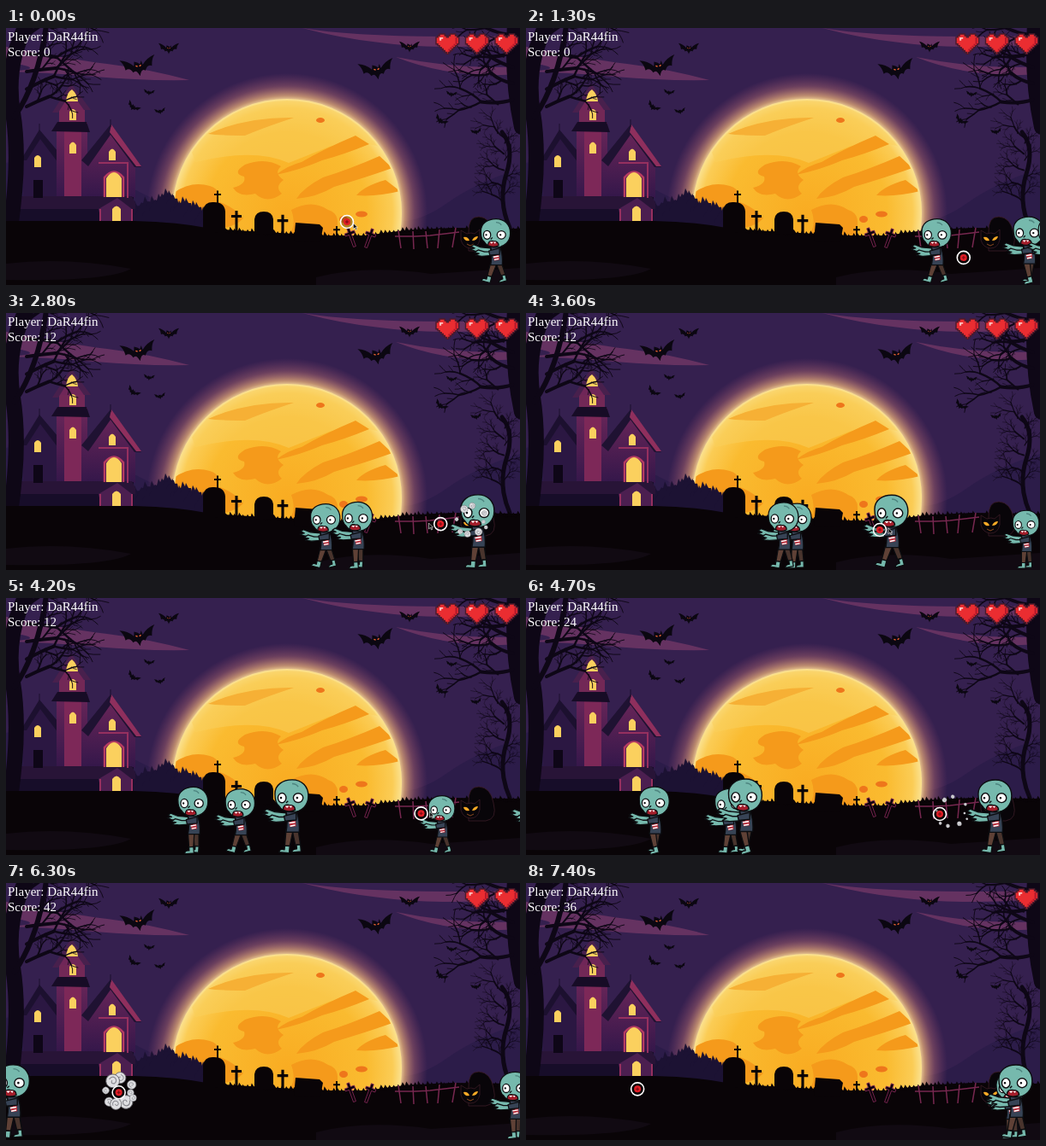
Recreate the animation shown at these times as an HTML page. Size 600 by 301 pixels, loop 7500 ms.

```html
<!DOCTYPE html>
<html lang="en">
<head>
<meta charset="utf-8">
<title>Zombie night</title>
<style>
html, body { margin: 0; width: 100%; height: 100%; overflow: hidden; background: #090407; }
svg { display: block; width: 600px; height: 301px; }
text { font: 15px "Liberation Serif", "Times New Roman", serif; fill: #fff; }
.tree { fill: none; stroke: #0e0716; stroke-linecap: round; }
.lit { fill: #fbd05e; }
.skin { fill: #76b9ad; }
.ink { stroke: #0c0d10; stroke-width: 1.2; stroke-linejoin: round; }
</style>
</head>
<body>
<svg viewBox="0 0 600 301">
<defs>
  <radialGradient id="sky" gradientUnits="userSpaceOnUse" r="1" gradientTransform="translate(308 120) scale(275 205)">
    <stop offset=".15" stop-color="#cf5f78"/><stop offset=".33" stop-color="#ac4a75"/>
    <stop offset=".58" stop-color="#7b316c"/><stop offset=".78" stop-color="#532860"/>
    <stop offset="1" stop-color="#35204f"/>
  </radialGradient>
  <radialGradient id="halo" gradientUnits="userSpaceOnUse" cx="328" cy="217" r="164">
    <stop offset=".8" stop-color="#ffe9a5"/><stop offset=".84" stop-color="#eab07a" stop-opacity=".75"/>
    <stop offset=".91" stop-color="#cf7a78" stop-opacity=".35"/><stop offset="1" stop-color="#b5557a" stop-opacity="0"/>
  </radialGradient>
  <radialGradient id="moon" gradientUnits="userSpaceOnUse" cx="328" cy="217" r="134">
    <stop offset="0" stop-color="#f9ac22"/><stop offset=".7" stop-color="#fabb30"/>
    <stop offset=".92" stop-color="#fbcc55"/><stop offset="1" stop-color="#fbe290"/>
  </radialGradient>
  <linearGradient id="wall" x2="0" y2="1">
    <stop offset="0" stop-color="#6b2659"/><stop offset="1" stop-color="#34174a"/>
  </linearGradient>
  <clipPath id="disc"><circle cx="328" cy="217" r="132"/></clipPath>
  <path id="bat" d="M0-6l2 2 2-4 1 5q6-7 15-9q-4 4-5 12q-5-3-8 4q-4-4-7 5q-3-9-7-5q-3-7-8-4q-1-8-5-12q9 2 15 9l1-5z"/>
  <path id="cross" d="M-1.5 0V-15H-6V-18H-1.5V-23H1.5V-18H6V-15H1.5V0z"/>
  <g id="heart">
    <path d="M2 0h3v1h1v1h1v-1h1v-1h3v1h1v1h1v4h-1v1h-1v1h-1v1h-1v1h-1v1h-1v1h-1v-1h-1v-1h-1v-1h-1v-1h-1v-1h-1v-1h-1v-4h1v-1h1z" fill="#ea2d31" stroke="#4b1a2b" stroke-width=".7"/>
    <path d="M2 2h2v1h-1v1h-1z" fill="#ffc4c0"/>
    <path d="M11 2h1v4h-1v1h-1v1h-1v1h-1v1h-1v-1h1v-1h1v-1h1v-1h1z" fill="#b5182a"/>
  </g>
  <g id="zombie" class="ink">
    <g class="leg"><path d="M0 34h6l1 15h-5z" fill="#49342d"/><path class="skin" d="M3 49h4v7h-9q0-3 5-3z"/></g>
    <g class="leg"><path d="M-6 34h7l-2 16h-5z" fill="#5f4136"/><path class="skin" d="M-6 50h5v7h-10q0-4 5-3z"/></g>
    <path d="M-6 15q6-3 10 0q4 9 3 21h-13q2-10 0-21z" fill="#374355"/>
    <path d="M-4 22l7-1 1 9-6 1z" fill="#b72c3a" stroke="none"/>
    <path d="M-3 24l5-1m-5 4l6-1m-5 4l5-1" stroke="#fff" stroke-width="1.3"/>
    <path class="skin" d="M-6 17l-11-1-8-3-3 2 4 2-5 1 5 2 8 1 10 1z"/>
    <path class="skin" d="M-1 21l-12 0-7-2-4 3 5 1-4 2 7 1 15-1z"/>
    <path d="M4 17l-12 3 1 5 11-1z" fill="#374355"/>
    <path class="skin" d="M-17-2C-17-11-9-16 0-16C10-16 16-9 16 0C16 9 10 16 0 16C-6 16-11 14-13 10C-16 8-17 3-17-2z"/>
    <g fill="#fff">
      <ellipse cx="-10" cy="2" rx="4" ry="4.8"/><ellipse cx="6" cy="2" rx="4.8" ry="4.6"/>
    </g>
    <circle cx="-11" cy="2" r=".5"/><circle cx="5" cy="2" r=".5"/>
    <path d="M-4 5l-2 2" fill="none"/>
    <path d="M-9 14q0-6 6-5q6 0 6 5q-6 3-12 0z" fill="#a41e2b"/>
    <path d="M-7 10l2 2 2-2 2 2 1-2" fill="#fff" stroke="none"/>
    <path d="M0-12q4 0 6 3" fill="none" stroke="#4d847f"/>
  </g>
</defs>

<rect width="600" height="301" fill="url(#sky)"/>
<g fill="#b3507f" opacity=".38">
  <path d="M0 22Q70 36 118 42T214 61Q160 62 104 57T0 51Q56 48 0 40z"/>
  <path d="M346 0Q420 13 600 9V19Q502 26 436 17Q390 12 346 0z"/>
  <path d="M455 34Q530 49 600 45V54Q520 60 455 34z"/>
</g>
<path d="M0 158Q50 142 100 165T200 215V240H0zM600 165Q550 180 515 205T450 226V262H600z" fill="#281a48" opacity=".7"/>
<circle cx="328" cy="217" r="164" fill="url(#halo)"/>
<circle cx="328" cy="217" r="134" fill="url(#moon)"/>
<g clip-path="url(#disc)" fill="#f59a1b">
  <path d="M215 140Q260 85 330 84Q400 86 440 140Q400 128 370 142L330 158Q290 140 221 157z" fill="#f9cf5b" opacity=".55"/>
  <path d="M236 124Q280 104 336 105Q300 117 279 126Q250 126 236 124z" fill="#f6b035"/>
  <path d="M408 126Q370 142 345 157Q329 161 315 172Q344 166 369 155Q395 148 424 136z"/>
  <path d="M436 150Q402 165 370 175Q347 187 339 200Q363 198 383 186Q420 175 451 164z"/>
  <path d="M279 160Q303 151 321 162Q312 170 324 178Q313 186 322 194Q305 207 291 194Q272 199 265 187Q281 183 278 174Q263 170 279 160z"/>
  <path d="M192 196Q214 178 238 185Q252 189 246 203Q265 208 277 223Q262 240 195 240z"/>
  <path d="M333 213q24-13 43 0q17 5 8 30h-55q11-10 4-30z"/>
  <path d="M443 178q-25 7-34 18q23 2 51-5z"/>
  <g fill="#ee761b">
    <ellipse cx="415" cy="218" rx="7" ry="3.5"/><ellipse cx="394" cy="224" rx="5" ry="4"/>
    <ellipse cx="367" cy="108" rx="5" ry="3"/>
  </g>
</g>
<g id="bushes" fill="#1c1233"></g>

<g id="house">
  <path d="M20 152L39 122 60 150V200H20z" fill="#2b1742"/>
  <path d="M39 119L17 155H24L40 130 61 158V145z" fill="#1c102f"/>
  <path d="M59 111H95V201H59z" fill="url(#wall)"/>
  <path d="M68 111H88V201H68z" fill="#7d2858"/>
  <path d="M62 90H92V112H62z" fill="#722856"/>
  <path d="M76 66L57 96H97z" fill="#702658"/>
  <path d="M76 65L54 99H61L76 75 91 96H99z" fill="#48204d"/>
  <path d="M53 121L60 110H94L98 122z" fill="#170c26"/>
  <path d="M94 150L123 116 151 159V199H94z" fill="url(#wall)"/>
  <path d="M122 113L88 155 96 162 122 125 150 163H158z" fill="#1f1232"/>
  <path d="M123 113L158 162H152L121 122z" fill="#8f2f5d"/>
  <path d="M7 198H149V229H7z" fill="#170d29"/>
  <path d="M4 204L16 197H147L151 205V212H4z" fill="#281437"/>
  <path d="M108 212L130 199 147 212V229H112z" fill="#4c1f50"/>
  <path d="M108 158H142V199M147 212V229M110 212V229" fill="none" stroke="#96305f" stroke-width="2"/>
  <path d="M115 198V175Q126 162 137 175V198" fill="none" stroke="#b53b62" stroke-width="2.5"/>
  <path d="M32 178H43V199H32z" fill="#0e0617"/>
  <g class="lit">
    <path d="M70 86Q71 75 77 72Q83 77 84 86z"/><path d="M74 108V98q4-6 8 0V108z"/>
    <path d="M74 147V137q4-7 8 0V147z"/><path d="M33 163V152q4-6 8 0V163z"/>
    <path d="M120 155V145q4-7 8 0V155z"/><path d="M117 198V176Q126 162 135 176V198z"/>
    <path d="M124 228V212q5-7 10 0V228z"/>
  </g>
  <path d="M76 55V67M39 112V121M122 107V116" stroke="#1c102f"/>
</g>

<g id="trees" class="tree">
  <path d="M5 234Q17 155 8 99T24-4" stroke-width="18"/>
  <path d="M10 104Q38 63 47-3" stroke-width="6"/>
  <path d="M602 116Q590 61 594-4" stroke-width="18"/>
  <path d="M588 234Q574 202 584 171T579 122" stroke-width="5"/>
</g>

<g id="ground" fill="#090407">
  <path d="M0 226H150Q200 227 240 235L300 239 375 243 420 243 465 237 520 234 600 235V301H0z"/>
</g>
<path d="M0 276Q70 268 146 282Q120 297 0 295zM362 292Q420 277 496 288L600 281V301H362z" fill="#110a12"/>
<g fill="#090407">
  <path d="M230 239V213Q232 203 243 204Q255 204 256 215V239z"/>
  <path d="M290 241V224Q291 215 301 215Q311 215 312 224V241z"/>
  <path d="M336 249L338 228 366 230 370 234 367 250z"/>
  <use href="#cross" transform="translate(247 206) scale(.67)"/>
  <use href="#cross" transform="translate(269 237)"/>
  <use href="#cross" transform="translate(323 243) scale(1.05)"/>
  <use href="#cross" transform="translate(386 247) scale(.65)"/>
  <g stroke="#832757" stroke-width=".8">
    <use href="#cross" transform="translate(407 256) rotate(-20)"/>
    <use href="#cross" transform="translate(420 257) rotate(20)"/>
  </g>
</g>
<path d="M458 237l3 21M475 238l1 21M490 238l2 20M506 236l-2 22M525 234l-4 23M454 244l24 0 17-1 34-4" stroke="#76274f" stroke-width="1.5" fill="none"/>
<g id="bats" fill="#0b0711"></g>
<g id="cat" fill="#080509" stroke="#43202c" stroke-width=".7">
  <path d="M540 240Q539 221 552 221Q566 222 569 240Q574 259 560 261H540z"/>
  <path d="M531 237l7 4q5-2 9 0l6-5 0 12q-2 10-11 10q-9-1-11-10z"/>
  <path d="M534 245q5-1 7 4q-6 1-7-4zM551 244q-5 0-7 5q6 0 7-5z" fill="#ffab26" stroke="none"/>
  <path d="M538 253l4 2 4-2" stroke="#c56b29" fill="none"/>
</g>

<g id="actors"></g>
<g id="puffs"></g>
<g id="hearts"></g>
<text x="2" y="15">Player: DaR44fin</text>
<text id="score" x="2" y="33">Score: 0</text>
<path id="arrow" d="M0 0V7L2 5.3 3 8 4.3 7.4 3.2 5H5z" fill="#111" stroke="#fff" stroke-width=".6"/>
<g id="aim">
  <circle r="7.5" fill="#120508" fill-opacity=".3" stroke="#fff" stroke-width="1.6"/>
  <circle r="4" fill="#e01e26"/><path d="M-2 0H2M0-2V2" stroke="#7a0b14"/>
</g>
</svg>

<script>
const LOOP = 7500, STEP = 100;
const $ = id => document.getElementById(id);
const place = (el, value) => el.setAttribute('transform', value);
const show = (el, on) => el.setAttribute('visibility', on ? 'visible' : 'hidden');

function add(parent, tag, attrs = {}) {
  const el = document.createElementNS('http://www.w3.org/2000/svg', tag);
  for (const key in attrs) el.setAttribute(key, attrs[key]);
  return parent.appendChild(el);
}

let seed = 7;
const rnd = () => (seed = seed * 16807 % 2147483647) / 2147483647;
const vary = span => (rnd() - .5) * span;

// Each branch forks twice at its tip and sends one twig from its middle
function grow(x, y, angle, len, width, forks) {
  const a = angle * Math.PI / 180;
  const ex = x + len * Math.cos(a), ey = y + len * Math.sin(a);
  const mx = (x + ex) / 2 + vary(len * .3), my = (y + ey) / 2 + vary(len * .3);
  add($('trees'), 'path', { d: `M${x} ${y}Q${mx} ${my} ${ex} ${ey}`, 'stroke-width': width });
  if (!forks) return;
  for (const side of [-1, 1])
    grow(ex, ey, angle + side * (16 + rnd() * 24), len * (.55 + rnd() * .25), width * .62, forks - 1);
  grow(mx, my, angle + (rnd() < .5 ? -45 : 45), len * .45, width * .5, forks - 1);
}
function limbs(x, top, bottom, n, angle, len) {
  for (let i = 0; i < n; i++)
    grow(x, top + (bottom - top) * i / (n - 1), angle + vary(40), len * (.8 + rnd() * .4), len / 8, 3);
}
limbs(24, 10, 92, 5, -12, 32);
limbs(592, 8, 84, 5, 186, 32);
limbs(581, 128, 205, 5, 212, 15);
limbs(582, 135, 195, 4, -40, 10);

for (let x = 146; x < 242; x += 4) {
  const top = 192 + Math.abs(x - 186) * .42 + rnd() * 12;
  add($('bushes'), 'path', { d: `M${x - 7} 240V${top + 7}l3-5 2 1 2-8 3 6 3 0 2 9V240z` });
}
for (let x = 240; x < 600; x += 5) {
  const y = x < 400 ? 235 + (x - 240) * .055 : 243 - Math.min(8, (x - 400) * .1);
  add($('ground'), 'path', { d: `M${x} ${y + 3}l${2 + vary(2)} ${-4 - rnd() * 3} 4 6z` });
}

// Two flocks share one order of sizes
const flocks = ['155,47 190,25 167,76 148,93 180,98', '433,51 471,23 520,78 507,109 549,122'];
const spans = [1.04, .6, .33, .42, .33];
for (const flock of flocks) flock.split(' ').forEach((spot, i) => {
  const bat = add($('bats'), 'g', { transform: `translate(${spot}) rotate(${[-10, 0, 5, 35][i % 4]}) scale(${spans[i]})` });
  add(bat, 'use', { href: '#bat' });
  if (i < 2) add(bat, 'path', { d: 'M-3-3l2 1M3-3l-2 1', stroke: '#f26632', 'stroke-width': 1.3 });
});

const hearts = [0, 1, 2].map(i =>
  add($('hearts'), 'use', { href: '#heart', transform: `translate(${502 + i * 34.5} 7) scale(2.05 1.95)` }));

// Walkers pass x at time t; one without a kill time walks off the left edge
function walker(x, t, speed, size, kill = Infinity) {
  const el = $('zombie').cloneNode(true);
  el.removeAttribute('id');
  $('actors').append(el);
  const at = time => x - speed * (time - t);
  return { el, at, size, kill, y: 300 - 58 * size, gone: t + (x + 20) / speed, legs: el.querySelectorAll('.leg') };
}
const walkers = [
  walker(572, 0, 71, 1.04, 6.2), walker(587, 1.3, 37, 1.06, 2.5),
  walker(301, 3.6, 137, 1.06), walker(427, 3.6, 155, 1.18),
  walker(584, 3.6, 125, .93, 4.3), walker(548, 4.7, 150, 1.18, 5.1),
  walker(567, 7.4, 25, 1.06), walker(572, 7.4, 150, 1.18)
];
const hits = walkers.filter(w => w.kill < Infinity).map(w => [w.kill, w.at(w.kill), w.y + 6]);
const losses = walkers.filter(w => w.kill === Infinity).map(w => w.gone);

const puffs = hits.map(([at, x, y]) => {
  const el = add($('puffs'), 'g', { transform: `translate(${x} ${y})` });
  const clouds = Array.from({ length: 9 }, () => {
    const g = add(el, 'g');
    add(g, 'circle', { r: 7, fill: '#dfdfe2', stroke: '#65656b', 'stroke-width': .8 });
    add(g, 'path', { d: 'M-4 1Q-4-4 0-4Q4-3 3 1Q0 4-1 0', fill: 'none', stroke: '#88888f' });
    return g;
  });
  return { at, el, clouds };
});

// The sight wanders over a few rests (seconds, x, y) and meets every hit
const trail = [
  [0, 398, 227], [1.2, 510, 269], [2.1, 517, 268], [3.6, 413, 254], [4.7, 483, 253], [7.5, 130, 241], ...hits
].sort((a, b) => a[0] - b[0]);
function aimAt(t) {
  const i = Math.max(1, trail.findIndex(p => p[0] >= t));
  const [a, b] = [trail[i - 1], trail[i]];
  const k = (t - a[0]) / (b[0] - a[0]);
  return [a[1] + (b[1] - a[1]) * k, a[2] + (b[2] - a[2]) * k];
}

function draw(t) {
  for (const w of walkers) {
    const x = w.at(t), swing = Math.sin(t * 9 + w.gone);
    show(w.el, t < w.kill && x > -40 && x < 640);
    place(w.el, `translate(${x} ${w.y + swing * .6}) scale(${w.size})`);
    w.legs.forEach((leg, i) => place(leg, `rotate(${(i ? 1 : -1) * swing * 16} 0 34)`));
  }
  for (const p of puffs) {
    const age = (t - p.at) / .5;
    show(p.el, age >= 0 && age < 1);
    p.clouds.forEach((c, i) => {
      const a = i * 2.4, r = 13 + (i % 3) * 2 + age * 3;
      const s = Math.max(0, 1.15 - age * 1.05) * (.6 + (i % 4) * .2);
      place(c, `translate(${r * Math.cos(a)} ${r * Math.sin(a)}) rotate(${i * 57}) scale(${s})`);
    });
  }
  const lost = losses.filter(at => t >= at).length;
  const killed = hits.filter(([at]) => t >= at).length;
  hearts.forEach((h, i) => show(h, i >= lost));
  $('score').textContent = 'Score: ' + (12 * killed - 6 * lost);
  const [x, y] = aimAt(t), [nx, ny] = aimAt(Math.min(7.5, t + .1));
  place($('aim'), `translate(${x} ${y})`);
  place($('arrow'), `translate(${nx - 2} ${ny - 2})`);
  show($('arrow'), Math.hypot(nx - x, ny - y) > 7);
}

const start = performance.now();
function tick() {
  const ms = (performance.now() - start) % LOOP;
  draw(Math.floor(ms / STEP) * STEP / 1000);
  requestAnimationFrame(tick);
}
tick();
</script>
</body>
</html>
```
